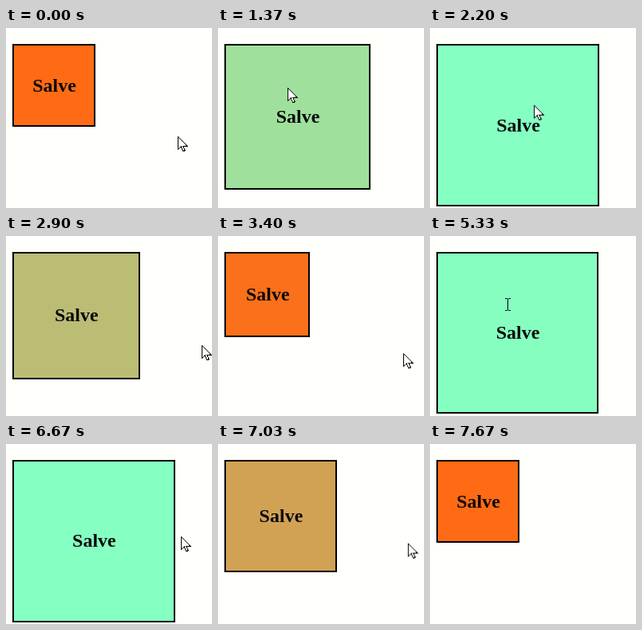
An HTML page for the animation above (7.71 s loop, 258x226 px).

```html
<!DOCTYPE html>
<html lang="it">
<head>
<meta charset="utf-8">
<title>Salve</title>
<style>
  :root {
    --loop: 7710ms;
    --cold: #ff6b14;
    --warm: #85ffc2;
  }
  html, body {
    margin: 0;
    width: 100%;
    height: 100%;
    overflow: hidden;
    background: #fffffb;
  }
  .box {
    position: absolute;
    left: 8px;
    top: 20px;
    width: 104px;
    aspect-ratio: 1;
    box-sizing: border-box;
    border: 2px solid #000;
    background: var(--cold);
    display: flex;
    align-items: center;
    justify-content: center;
    animation: hover var(--loop) infinite;
  }
  h2 {
    margin: 0;
    padding-left: 1px;
    font: bold 24px "Liberation Serif", "Times New Roman", serif;
    color: #0a0a0a;
  }
  .cursor {
    position: absolute;
    left: 0;
    top: 0;
    width: 1px;
    height: 1px;
    overflow: visible;
    shape-rendering: crispEdges;
    animation: move var(--loop) linear infinite;
  }
  .cursor path { stroke: #000; animation: var(--loop) step-end infinite; }
  .cursor .arrow { fill: #fff; animation-name: arrow; }
  .cursor .beam { fill: none; animation-name: beam; }

  /* One-second ease in and out of the hover state */
  @keyframes hover {
    0% { width: 104px; background: var(--cold); animation-timing-function: step-end; }
    8.171% { width: 187px; background: color-mix(in srgb, var(--warm) 83%, var(--cold)); animation-timing-function: ease-out; }
    14.008%, 15.759% { width: 204px; background: var(--warm); animation-timing-function: ease-in; }
    17.769% { width: 183px; background: color-mix(in srgb, var(--warm) 79%, var(--cold)); }
    20.493%, 22.568% { width: 204px; background: var(--warm); }
    24.254% { width: 189px; background: color-mix(in srgb, var(--warm) 85%, var(--cold)); }
    26.2%, 34.18% { width: 204px; background: var(--warm); }
    47.15%, 57.847% { width: 104px; background: var(--cold); }
    70.817%, 86.45% { width: 204px; background: var(--warm); }
    99.416%, 100% { width: 104px; background: var(--cold); }
  }

  @keyframes move {
    0%, .389% { transform: translate(215px, 136px); }
    1.686%, 8.171% { transform: translate(48px, 72px); }
    9.468% { transform: translate(100px, 80px); }
    11.025% { transform: translate(221px, 95px); }
    12.97% { transform: translate(130px, 130px); }
    15.564% { transform: translate(10px, 100px); }
    16.472% { transform: translate(0, 95px); }
    17.769% { transform: translate(87px, 75px); }
    19.455% { transform: translate(100px, 60px); }
    22.049% { transform: translate(180px, 40px); }
    23.346% { transform: translate(245px, 3px); }
    24.254% { transform: translate(210px, 30px); }
    27.237% { transform: translate(120px, 90px); }
    31.128% { transform: translate(150px, 110px); }
    34.18% { transform: translate(212px, 130px); }
    37.613% { transform: translate(245px, 137px); }
    38.521% { transform: translate(241px, 140px); }
    41.505% { transform: translate(236px, 152px); }
    45.396% { transform: translate(230px, 145px); }
    49.287% { transform: translate(225px, 138px); }
    57.458% { transform: translate(114px, 97px); }
    59.663%, 70.039% { transform: translate(97px, 86px); }
    73.93% { transform: translate(70px, 60px); }
    77.821% { transform: translate(110px, 80px); }
    81.064% { transform: translate(150px, 100px); }
    86.511% { transform: translate(219px, 116px); }
    90.791% { transform: translate(235px, 124px); }
    94.682%, 100% { transform: translate(262px, 130px); }
  }

  /* The text cursor replaces the arrow over the word */
  @keyframes arrow {
    0%, 8.431%, 71.336%, 100% { opacity: 1; }
    1.427%, 59.144% { opacity: 0; }
  }
  @keyframes beam {
    0%, 8.431%, 71.336%, 100% { opacity: 0; }
    1.427%, 59.144% { opacity: 1; }
  }
</style>
</head>
<body>
  <div class="box"><h2>Salve</h2></div>
  <svg class="cursor">
    <path class="arrow" d="M.5 .5V16.5L4.2 12.8 6.9 18.8 9.2 17.8 6.6 12H11.7Z"/>
    <path class="beam" d="M-3 -7.5H0M1 -7.5H4M.5 -7V7M-3 7.5H0M1 7.5H4"/>
  </svg>
</body>
</html>
```
